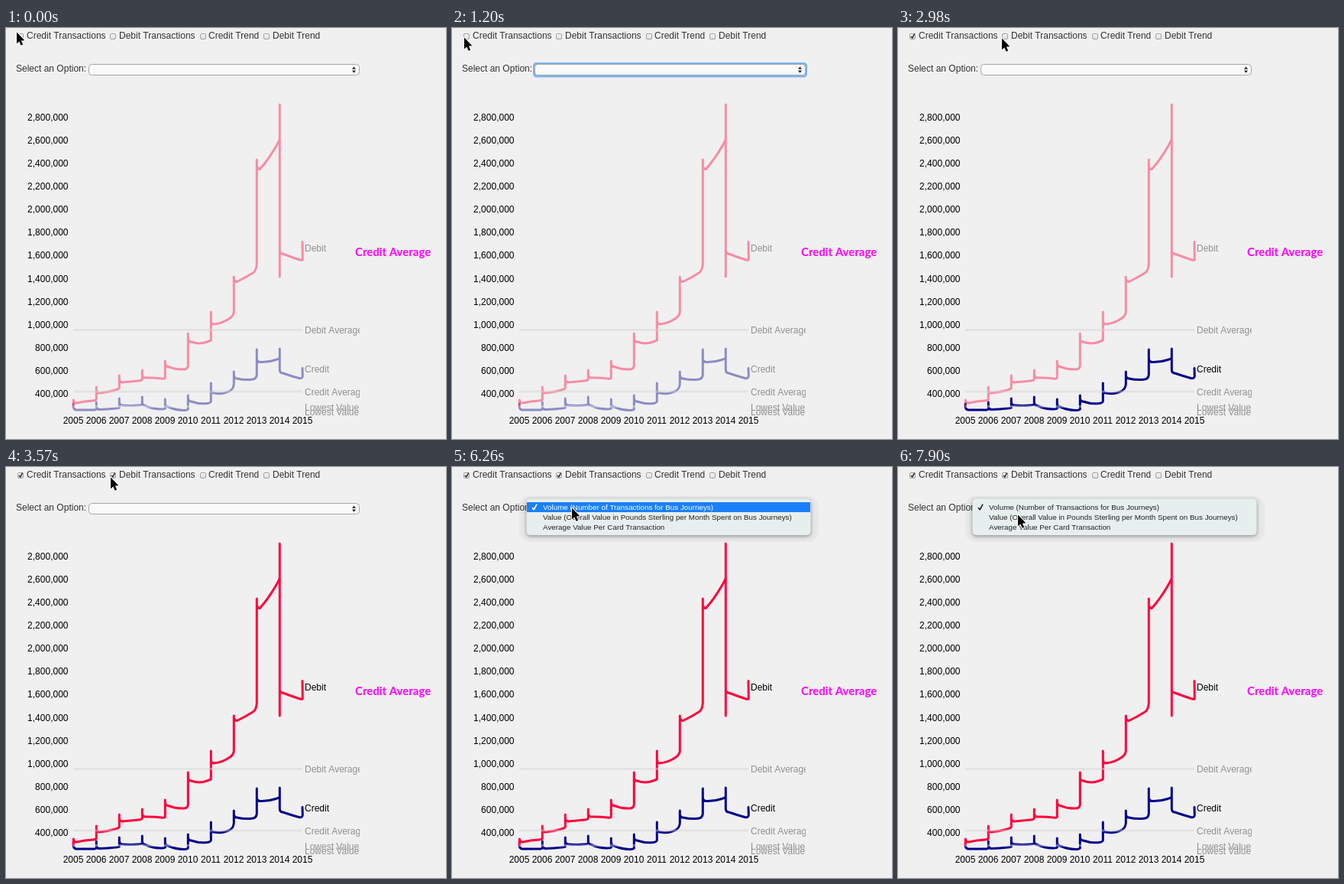
Animation of 576x537 px, one loop 8000 ms. Source, as an HTML page with a canvas:

```html
<!DOCTYPE html>
<html lang="en">
<head>
<meta charset="utf-8">
<title>Card transactions chart</title>
<style>
html, body { margin: 0; width: 100%; height: 100%; overflow: hidden; background: #f0f0f0; }
canvas { display: block; }
</style>
</head>
<body>
<canvas id="stage" width="576" height="537"></canvas>
<script>
const ctx = document.getElementById('stage').getContext('2d');
const LOOP = 8000;
const SANS = '"Liberation Sans", Arial, sans-serif';
const NAVY = '#00008b', RED = '#ff003c';
const FADED = 0.42;

// One row per year: spike top, left level, middle, right level, end, optional dip
const debit = [
  [487, 490, 488, 487, 485, 494],
  [469, 477, 475.5, 473, 470],
  [454, 463, 462, 461, 459],
  [447, 457, 457, 458, 457],
  [435, 442.5, 445.5, 446, 441],
  [399, 410, 412, 410, 408],
  [371, 387, 384.5, 379, 371],
  [325, 331.5, 326, 320, 308],
  [172, 184.5, 171, 155, 145],
  [100, 295, 299, 302.5, 303, 325]
];
const credit = [
  [491, 499, 499, 499, 498],
  [489, 498.5, 498, 497, 496],
  [484, 493, 493.5, 493, 492],
  [482, 493.5, 497, 498, 497],
  [485, 495, 498.5, 499.5, 498],
  [480, 488, 490.5, 490.5, 488],
  [464, 477, 477.5, 474, 465],
  [449, 458, 459.5, 459, 453],
  [420, 436.5, 436, 433.5, 431],
  [419, 451, 454.5, 457.5, 455]
];

// Time, left, top of the pointer; the fourth value marks a text caret
const pointer = [
  [0, 13, 5], [150, 13, 6], [300, 15, 9], [450, 15, 12], [1650, 17, 12],
  [1790, 18, 11], [2090, 18, 10], [2540, 50, 5, 1], [2680, 126, 7, 1],
  [2980, 135, 13], [3130, 136, 13], [4170, 154, 40], [4310, 155, 44],
  [4460, 155, 51], [4610, 156, 53], [6710, 156, 59], [6850, 156, 62]
];

const boxes = [
  [15, 27, 'Credit Transactions', 2090],
  [136, 148, 'Debit Transactions', 3570],
  [254, 265, 'Credit Trend', Infinity],
  [337, 349, 'Debit Trend', Infinity]
];

const options = [
  'Volume (Number of Transactions for Bus Journeys)',
  'Value (Overall Value in Pounds Sterling per Month Spent on Bus Journeys)',
  'Average Value Per Card Transaction'
];

function text(str, x, y, color = '#000', align = 'left', font = '12px ' + SANS) {
  ctx.font = font;
  ctx.fillStyle = color;
  ctx.textAlign = align;
  ctx.fillText(str, x, y);
}

function round(x, y, w, h, r) {
  ctx.beginPath();
  ctx.roundRect(x, y, w, h, r);
}

function poly(...pts) {
  ctx.beginPath();
  for (let i = 0; i < pts.length; i += 2) ctx.lineTo(pts[i], pts[i + 1]);
}

function hline(y, color) {
  ctx.strokeStyle = color;
  ctx.lineWidth = 3;
  poly(88, y, 388, y);
  ctx.stroke();
}

function series(rows, last, color, alpha) {
  ctx.beginPath();
  rows.forEach(([top, a, m, e, z, dip], i) => {
    const x = 88.3 + i * 30;
    const bend = 2 * m - (a + e) / 2;
    ctx.lineTo(x, top);
    if (dip) ctx.lineTo(x, dip);
    ctx.lineTo(x, a - 4);
    ctx.quadraticCurveTo(x + 0.6, a, x + 4, a);
    ctx.quadraticCurveTo(x + 15, bend, x + 25, e);
    ctx.quadraticCurveTo(x + 29.5, e + (e - bend) * 0.45, x + 30, z);
  });
  ctx.lineTo(388, last);
  ctx.globalAlpha = alpha;
  ctx.strokeStyle = color;
  ctx.lineWidth = 3;
  ctx.lineJoin = ctx.lineCap = 'round';
  ctx.stroke();
  ctx.globalAlpha = 1;
  ctx.lineCap = 'butt';
}

function chart(t) {
  const creditOn = t >= 2090, debitOn = t >= 3570, grey = '#909090';
  for (let i = 0; i < 13; i++)
    text((2800000 - i * 200000).toLocaleString('en-US'), 81.5, 121 + i * 30.08, '#000', 'right');
  for (let i = 0; i < 11; i++) text(2005 + i, 88 + i * 30, 517, '#000', 'center');

  series(credit, 444.5, NAVY, creditOn ? 1 : FADED);
  series(debit, 279.5, RED, debitOn ? 1 : FADED);
  hline(394.5, 'rgba(211,211,211,.45)');
  hline(475, 'rgba(211,211,211,.45)');
  hline(494.5, 'rgba(240,240,240,.4)');

  ctx.save();
  ctx.beginPath();
  ctx.rect(0, 0, 463, 537);
  ctx.clip();
  text('Debit', 391, 292, debitOn ? '#000' : grey);
  text('Credit', 391, 450, creditOn ? '#000' : grey);
  text('Debit Average', 391, 399, grey);
  text('Credit Average', 391, 479.5, grey);
  text('Lowest Value', 391, 499.5, grey);
  text('Lowest Value', 391, 506, grey);
  ctx.restore();
  text('Credit Average', 457, 298, '#ff00ff', 'left', 'bold 15px Lato, sans-serif');
}

function tick(x, y, s, color) {
  ctx.strokeStyle = color;
  ctx.lineWidth = 1.6;
  poly(x, y, x + 2 * s, y + 2.5 * s, x + 5.5 * s, y - 4 * s);
  ctx.stroke();
}

function checkbox(x, on) {
  const fill = ctx.createLinearGradient(0, 7, 0, 15);
  fill.addColorStop(0, '#f6f6f6');
  fill.addColorStop(1, '#dcdcdc');
  round(x + 0.5, 7.5, 7, 7, 1.5);
  ctx.fillStyle = fill;
  ctx.fill();
  ctx.strokeStyle = '#a2a2a2';
  ctx.lineWidth = 1;
  ctx.stroke();
  if (on) tick(x + 2, 11, 0.85, '#333');
}

function controls(t) {
  for (const [x, tx, label, at] of boxes) {
    checkbox(x, t >= at);
    text(label, tx, 14, '#333');
  }
  text('Select an Option:', 13, 57, '#333');
  if (t >= 1200 && t < 2090) {
    round(107.5, 46.5, 356, 16.5, 3);
    ctx.strokeStyle = '#7db3f0';
    ctx.lineWidth = 3;
    ctx.stroke();
  }
  round(108.5, 47.5, 354, 14, 4);
  ctx.fillStyle = '#fafafa';
  ctx.fill();
  ctx.strokeStyle = '#a6a6a6';
  ctx.lineWidth = 1;
  ctx.stroke();
  ctx.fillStyle = '#222';
  poly(453, 53.7, 455.5, 50.5, 458, 53.7);
  ctx.fill();
  poly(453, 55.5, 455.5, 58.7, 458, 55.5);
  ctx.fill();
}

function menu(t) {
  if (t < 6260) return;
  const active = t < 6850 ? 0 : t < 7900 ? 1 : -1;
  round(88, 38, 392, 60, 14);
  ctx.fillStyle = 'rgba(0,0,0,.035)';
  ctx.fill();
  ctx.save();
  ctx.shadowColor = 'rgba(0,0,0,.4)';
  ctx.shadowBlur = 5;
  ctx.shadowOffsetY = 1.5;
  round(97.5, 41.5, 372, 47.5, 5);
  ctx.fillStyle = '#e7efee';
  ctx.fill();
  ctx.restore();
  if (active >= 0) {
    ctx.fillStyle = '#1b80f7';
    ctx.fillRect(98, 46 + active * 13, 371, 13);
  }
  options.forEach((label, i) =>
    text(label, 119, 56.3 + i * 13, i === active ? '#fff' : '#222', 'left', '9.83px ' + SANS));
  tick(105, 53, 1.1, active === 0 ? '#fff' : '#222');
}

function cursor(t) {
  const [, x, y, caret] = pointer.findLast(p => p[0] <= t);
  ctx.save();
  ctx.translate(x, y);
  if (caret) {
    ctx.strokeStyle = '#222';
    ctx.lineWidth = 1;
    poly(0.5, 0.5, 2.5, 0.5, 3.5, 2, 3.5, 14, 2.5, 15.5, 0.5, 15.5);
    ctx.stroke();
    poly(6.5, 0.5, 4.5, 0.5, 3.5, 2, 3.5, 14, 4.5, 15.5, 6.5, 15.5);
    ctx.stroke();
  } else {
    poly(1, 0.5, 1, 15.5, 4.3, 12.5, 6.6, 17.8, 9.2, 16.7, 6.9, 11.5, 11.4, 11.2);
    ctx.closePath();
    ctx.lineJoin = 'round';
    ctx.strokeStyle = '#fff';
    ctx.lineWidth = 1.8;
    ctx.stroke();
    ctx.fillStyle = '#000';
    ctx.fill();
  }
  ctx.restore();
}

function draw(now) {
  const t = now % LOOP;
  ctx.fillStyle = '#f0f0f0';
  ctx.fillRect(0, 0, 576, 537);
  chart(t);
  controls(t);
  menu(t);
  cursor(t);
}

const start = performance.now();
function frame() {
  draw(performance.now() - start);
  requestAnimationFrame(frame);
}
frame();
</script>
</body>
</html>
```
